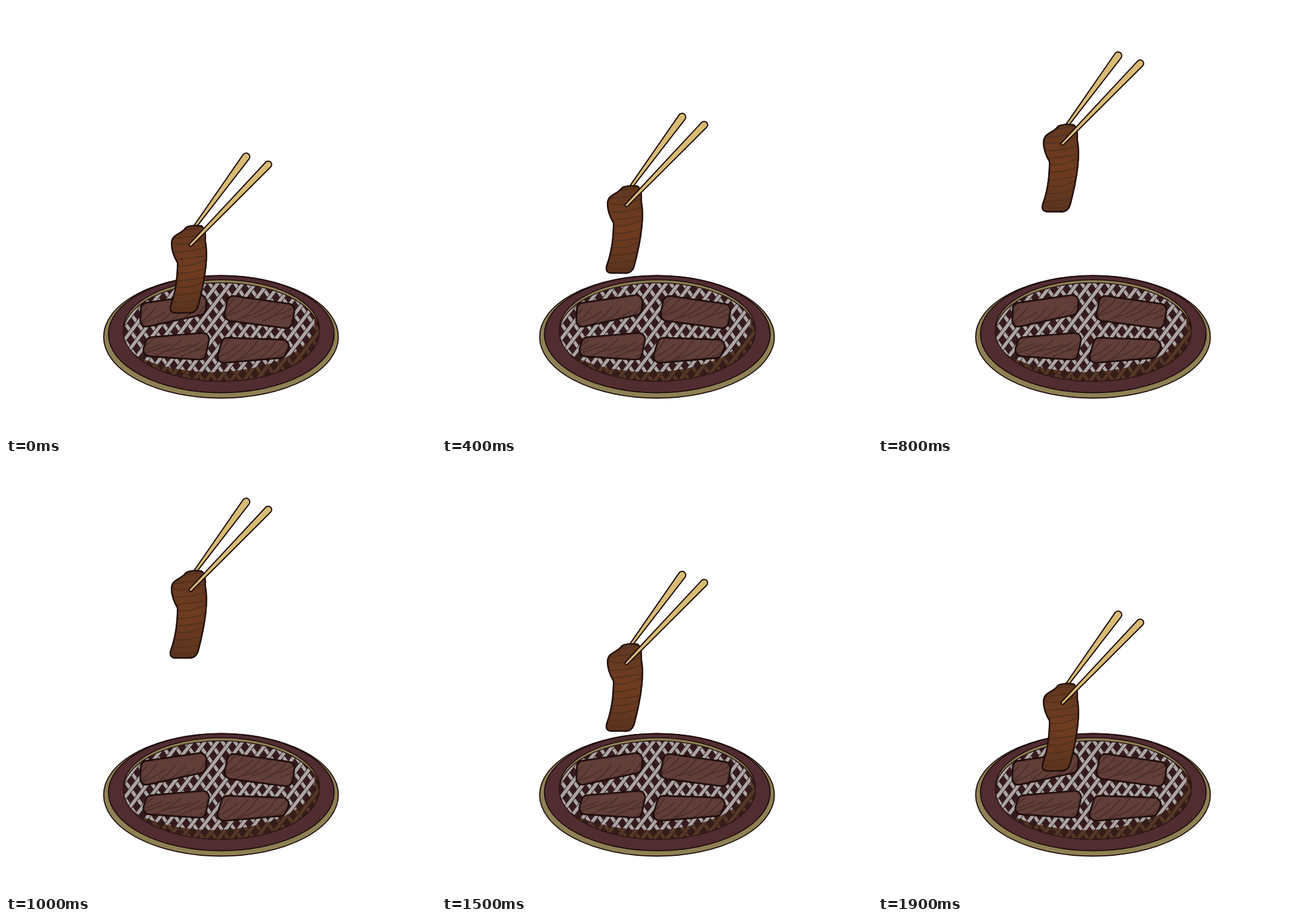
These frames come from a looping animation (720x720 px, 2 s). An HTML page with a canvas:

```html
<!DOCTYPE html>
<html lang="en">
<head>
<meta charset="utf-8">
<title>Grill</title>
<style>
  html, body { margin: 0; width: 100%; height: 100%; overflow: hidden; background: #fff; }
  canvas { display: block; width: 100vw; height: 100vh; }
</style>
</head>
<body>
<canvas id="stage" width="720" height="720"></canvas>
<script>
const ctx = document.getElementById('stage').getContext('2d');
const LOOP = 2000, STEP = 100, RISE = 189;
const INK = '#1c0c0b', GOLD = '#8e8153';

function ellipse(x, y, rx, ry) {
  const path = new Path2D();
  path.ellipse(x, y, rx, ry, 0, 0, Math.PI * 2);
  return path;
}

// Four corners, clockwise from the top left, joined with rounded turns
function rounded(corners, radius) {
  const path = new Path2D(), [a, b] = corners;
  path.moveTo((a[0] + b[0]) / 2, (a[1] + b[1]) / 2);
  for (let i = 1; i <= 4; i++) {
    path.arcTo(...corners[i % 4], ...corners[(i + 1) % 4], radius);
  }
  path.closePath();
  return path;
}

const slices = [
  [[226, 498], [337, 482], [334, 516], [224, 540]],
  [[372, 484], [485, 500], [478, 541], [364, 526]],
  [[236, 555], [343, 546], [333, 593], [226, 586]],
  [[363, 555], [479, 559], [466, 589], [350, 599]]
];

const strip = new Path2D('M277 398 C277 381 293 383 301 371 Q309 366 327 368 Q335 372 334 394 ' +
  'Q341 430 322 502 Q318 515 305 514 H283 Q272 513 276 500 Q287 470 287 430 Q277 413 277 398 Z');

function outline(path, color, width) {
  ctx.strokeStyle = color;
  ctx.lineWidth = width;
  ctx.stroke(path);
}

function paint(path, fill, width = 1.8) {
  ctx.fillStyle = fill;
  ctx.fill(path);
  outline(path, INK, width);
}

function clipped(path, draw) {
  ctx.save();
  ctx.clip(path);
  draw();
  ctx.restore();
}

function segment(x1, y1, x2, y2, color, width) {
  const path = new Path2D();
  path.moveTo(x1, y1);
  path.lineTo(x2, y2);
  outline(path, color, width);
}

function grain(x1, y1, cx, cy, x2, y2, color, width) {
  const path = new Path2D();
  path.moveTo(x1, y1);
  path.quadraticCurveTo(cx, cy, x2, y2);
  outline(path, color, width);
}

function mesh(gap, bar) {
  const top = 455, bottom = 635;
  ctx.fillStyle = gap;
  ctx.fillRect(190, top, 340, bottom - top);
  for (const lean of [128, -138]) {
    for (let x = 20; x < 700; x += 21) {
      const x1 = x - lean / 2, x2 = x + lean / 2;
      segment(x1, top, x2, bottom, gap, 7.4);
      segment(x1, top, x2, bottom, bar, 5.4);
    }
  }
}

function drawPlate() {
  const well = ellipse(360.5, 546, 164, 82.5);
  paint(ellipse(360, 554, 196.5, 102.5), GOLD);
  paint(ellipse(360.5, 549.5, 189, 98), '#512c30');
  paint(ellipse(360.5, 541, 164, 82.5), GOLD, 1.6);
  clipped(well, () => {
    mesh('#361b1e', '#aaa6a5');
    // Everything outside the raised disc is the shaded side of the well
    const shade = ellipse(346, 531.5, 171, 81.5);
    shade.rect(100, 400, 520, 300);
    ctx.clip(shade, 'evenodd');
    mesh('#351d18', '#563826');
  });
  outline(well, '#2b1415', 1.6);
}

function drawSlice(corners, seed) {
  const path = rounded(corners, 11);
  const [[left, top], [right], , [, bottom]] = corners;
  paint(path, '#613f38');
  clipped(path, () => {
    for (let x = left - 40, i = seed; x < right; x += 16, i++) {
      const sway = 5 * Math.sin(i * 2.3);
      grain(x, bottom - 2 + sway, x + 30 + sway, bottom - 11, x + 50, top + 8 - sway, '#4d2f29', 2);
    }
    outline(path, 'rgba(45,22,20,.4)', 5);
  });
  outline(path, INK, 2.2);
}

function drawStrip() {
  const tone = ctx.createLinearGradient(0, 368, 0, 514);
  tone.addColorStop(0, '#633820');
  tone.addColorStop(0.5, '#6f3c20');
  tone.addColorStop(1, '#5c341f');
  paint(strip, tone);
  clipped(strip, () => {
    for (let y = 374, i = 0; y < 522; y += 12, i++) {
      const sway = 5 * Math.sin(i * 2.1);
      grain(272, y + sway, 302, y + 6 - sway, 340, y - 9 + sway, '#51301d', 1.8);
    }
    outline(strip, 'rgba(50,24,14,.35)', 5);
  });
  outline(strip, INK, 1.8);
}

// Tapered stick with rounded ends
function stick(x1, y1, r1, x2, y2, r2) {
  const a = Math.atan2(y2 - y1, x2 - x1), q = Math.PI / 2;
  const path = new Path2D();
  path.arc(x1, y1, r1, a + q, a - q);
  path.arc(x2, y2, r2, a - q, a + q);
  path.closePath();
  paint(path, '#d8bb74', 2);
}

const smooth = u => u * u * (3 - 2 * u);

// Rises for a second, then mirrors back and rests briefly on the plate
function lift(ms) {
  const t = ms / 1000;
  return RISE * smooth(t <= 1 ? t : 1.9 - t);
}

function frame(now) {
  const ms = Math.floor(now % LOOP / STEP) * STEP;
  ctx.fillStyle = '#fff';
  ctx.fillRect(0, 0, 720, 720);
  drawPlate();
  slices.forEach((corners, i) => drawSlice(corners, i * 3));
  ctx.save();
  ctx.translate(0, -lift(ms));
  stick(402, 252.5, 6.2, 313, 374, 2.2);
  drawStrip();
  stick(439, 265.5, 5.8, 309, 400, 2.4);
  ctx.restore();
}

const start = performance.now();
function tick() {
  frame(performance.now() - start);
  requestAnimationFrame(tick);
}
tick();
</script>
</body>
</html>
```
